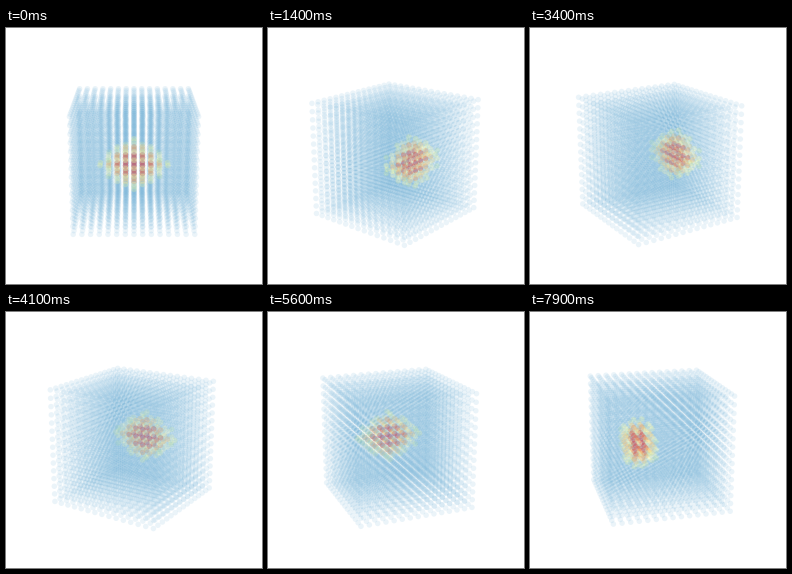
A matplotlib script for the animation above (8 s loop, 256 by 256 pixels).

```python
import numpy as np
import matplotlib.pyplot as plt
from matplotlib.animation import FuncAnimation

SIZE, DPI = 256, 64
FRAMES, INTERVAL = 80, 100
N = 15                      # points per cube edge
STEP = np.radians(3.6)      # turn per frame
ELEV = np.radians(18.4)
DIST = 11.4                 # camera distance in half edges
SCALE = 57.4                # pixels per half edge
CENTER = 128, 129.5
RADIUS = 2.75
COLD = 107 / 255, 174 / 255, 214 / 255, 0.135

axis = np.linspace(-1, 1, N)
X, Y, Z = (g.ravel() for g in np.meshgrid(axis, axis, axis))


def colours():
    """Pale blue lattice with a hot, diamond-like core."""
    p = 1.4
    face = (np.abs(X / 0.62) ** p + np.abs(Z / 0.47) ** p) ** (1 / p)
    r = (face ** 3 + np.abs((Y + 0.357) / 0.3) ** 3) ** (1 / 3)
    hot = r < 1
    rgba = np.tile(COLD, (len(r), 1))
    rgba[hot] = plt.get_cmap("Spectral_r")(0.9 - 0.6 * r[hot] ** 2.5)
    rgba[hot, 3] = 0.6 - 0.3 * r[hot] ** 2
    return rgba


def project(angle):
    """Screen positions and depth towards the camera."""
    c, s = np.cos(angle), np.sin(angle)
    right, away = X * c - Y * s, X * s + Y * c
    up = Z * np.cos(ELEV) + away * np.sin(ELEV)
    depth = Z * np.sin(ELEV) - away * np.cos(ELEV)
    k = SCALE * DIST / (DIST - depth)
    return np.column_stack([CENTER[0] + k * right, CENTER[1] - k * up]), depth


fig = plt.figure(figsize=(SIZE / DPI, SIZE / DPI), dpi=DPI, facecolor="white")
ax = fig.add_axes([0, 0, 1, 1])
ax.set(xlim=(0, SIZE), ylim=(SIZE, 0))
ax.axis("off")
dots = ax.scatter(X, Y, s=(2 * RADIUS * 72 / DPI) ** 2, linewidths=0)
rgba = colours()


def update(i):
    pos, depth = project(i * STEP)
    order = np.argsort(depth)
    dots.set_offsets(pos[order])
    dots.set_facecolors(rgba[order])
    return dots,


anim = FuncAnimation(fig, update, frames=FRAMES, interval=INTERVAL,
                     repeat=True, repeat_delay=0, blit=False)
plt.show()
```
